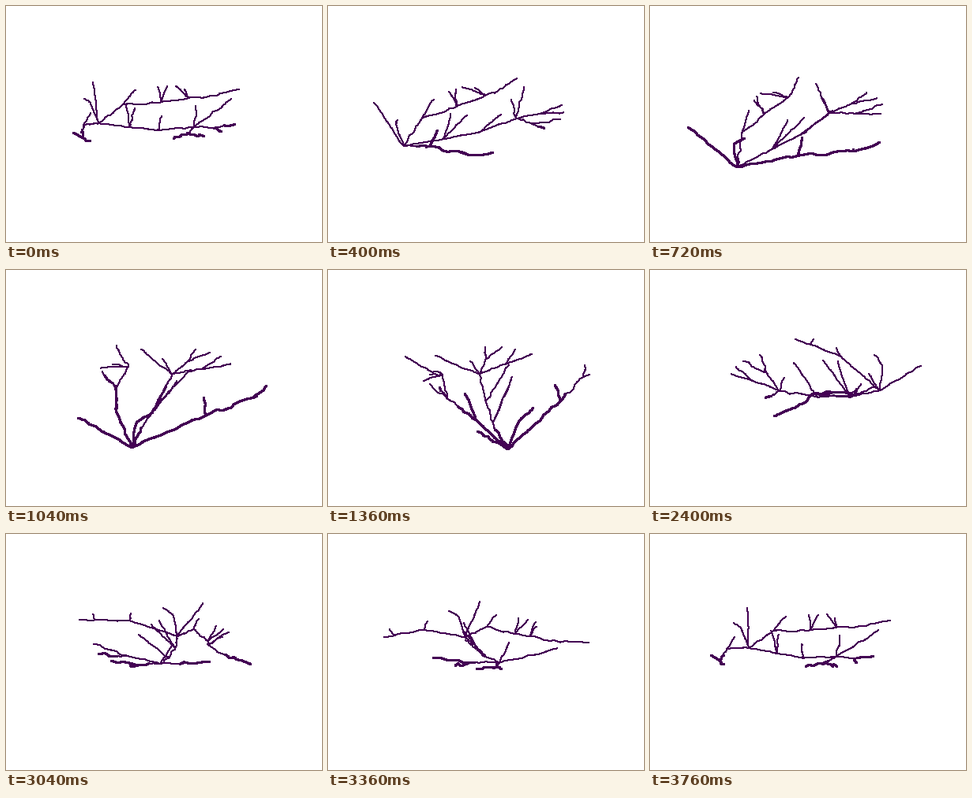
Write an HTML page with a canvas that moves like this. It is 400 px wide and 300 px high and loops after 3840 ms.

```html
<!DOCTYPE html>
<html>
<head>
<meta charset="utf-8">
<style>
html, body { margin: 0; width: 100%; height: 100%; overflow: hidden; background: #fff; }
canvas { display: block; width: 400px; height: 300px; }
</style>
</head>
<body>
<canvas id="stage" width="400" height="300"></canvas>
<script>
const ctx = document.getElementById("stage").getContext("2d");
const STEP_MS = 80, STEPS = 48;
const CENTER_X = 201, CENTER_Y = 150, DISTANCE = 400;
const TILT = 25 * Math.PI / 180;
const SIN = Math.sin(TILT), COS = Math.cos(TILT);

// Points are [right, toward viewer, height]; most tips share one height.
const tip = (x, z) => [x, z, 25];
const root = [-94, -46, -20];

const hook = [-102, -40, 14];
const east1 = [-95, 28, 12], east2 = [-83, 80, 22];
const far1 = [-60, -60, 3], far2 = [-6, -61, 6], far3 = [33, -44, 19], far4 = [58, -50, 18];
const low0 = [-48, -28, -18], low1 = [-8, -8, -13], low2 = [36, 15, 3];
const low3 = [25, 52, 13], low4 = [55, 40, 14];

const branches = [
  [root, [-108, -92, 26]],
  [root, hook, tip(-105, -25)],
  [root, east1, east2, [-70, 100, 29]],
  [east1, [-85, 28, 27]],
  [east2, [-91, 81, 28]],
  [root, far1, far2, far3, far4, [104, -60, 26]],
  [far1, tip(-41, -60)],
  [far2, tip(-10, -72)],
  [far2, tip(4, -76)],
  [far3, tip(16, -78)],
  [far3, tip(28, -64)],
  [root, low0, low1, low2, low4, tip(75, 55)],
  [low2, tip(86, -24)],
  [low2, tip(38, 2)],
  [low4, tip(58, 72)],
  [low2, low3, tip(39, 83)],
  [low3, tip(9, 87)],
  [low0, tip(-49, -5)],
  [low0, tip(-36, 9)],
  [low1, tip(-4, 32)]
];

let seed = 7;
function jitter(size) {
  seed = (seed * 16807) % 2147483647;
  return (seed / 2147483647 - 0.5) * size;
}

// Split each branch into short, slightly uneven pieces.
function roughen(points) {
  const out = [points[0]];
  for (let i = 1; i < points.length; i++) {
    const a = points[i - 1], b = points[i];
    const pieces = Math.max(1, Math.round(Math.hypot(b[0] - a[0], b[1] - a[1], b[2] - a[2]) / 7));
    for (let j = 1; j < pieces; j++) {
      out.push(a.map((v, k) => v + (b[k] - v) * j / pieces + jitter(2.6)));
    }
    out.push(b);
  }
  return out;
}
const tree = branches.map(roughen);

function project([x, z, h], angle) {
  const c = Math.cos(angle), s = Math.sin(angle);
  const side = x * c + z * s;
  const depth = z * c - x * s;
  const scale = 1 / (1 - (depth * COS + h * SIN) / DISTANCE);
  return [CENTER_X + side * scale, CENTER_Y + (depth * SIN - h * COS) * scale, scale];
}

// Square pixel brush keeps the edges hard.
function drawLine(a, b) {
  const n = Math.max(1, Math.ceil(Math.max(Math.abs(b[0] - a[0]), Math.abs(b[1] - a[1]))));
  const size = a[2] + b[2] > 2.3 ? 3 : 2;
  for (let i = 0; i <= n; i++) {
    const x = a[0] + (b[0] - a[0]) * i / n;
    const y = a[1] + (b[1] - a[1]) * i / n;
    ctx.fillRect(Math.round(x - size / 2), Math.round(y - size / 2), size, size);
  }
}

function draw(time) {
  const step = Math.floor(time / STEP_MS) % STEPS;
  const angle = step / STEPS * 2 * Math.PI;
  ctx.fillStyle = "#fff";
  ctx.fillRect(0, 0, 400, 300);
  ctx.fillStyle = "#440154";
  for (const branch of tree) {
    const line = branch.map(p => project(p, angle));
    for (let i = 1; i < line.length; i++) drawLine(line[i - 1], line[i]);
  }
}

const start = performance.now();
function loop() {
  draw(performance.now() - start);
  requestAnimationFrame(loop);
}
loop();
</script>
</body>
</html>
```
